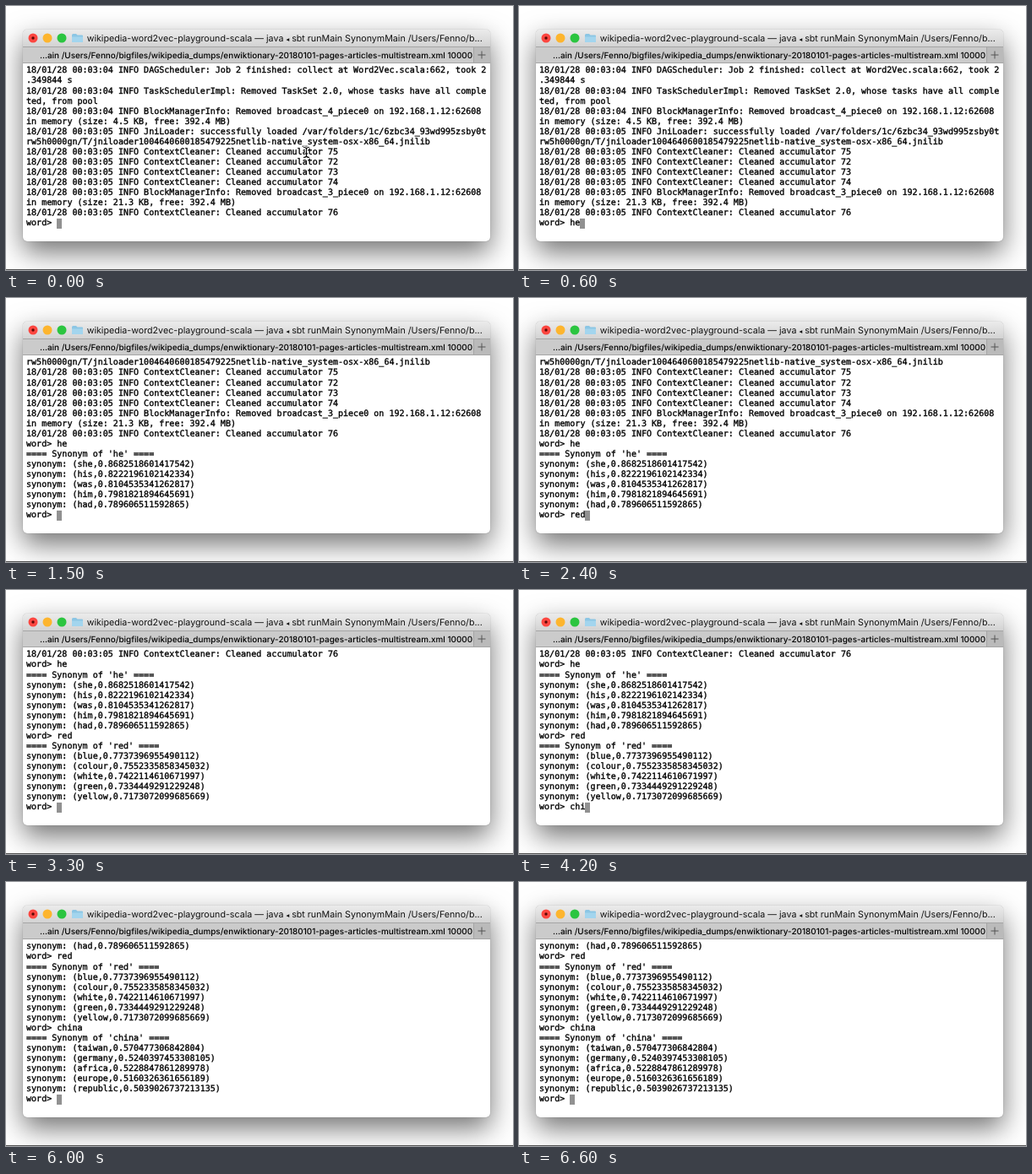
Animation, 600 px wide and 313 px high, one loop 6.9 s. Source, as an HTML page:

```html
<!DOCTYPE html>
<html lang="en">
<head>
<meta charset="utf-8">
<title>Synonym terminal</title>
<style>
html, body { margin: 0; width: 100%; height: 100%; overflow: hidden; background: #fff; }
.stage { position: relative; width: 600px; height: 313px; overflow: hidden; }
.window {
  position: absolute; left: 20px; top: 28px; width: 553px; height: 251px;
  border-radius: 5px; background: #fff;
  box-shadow: 0 0 1px rgba(0,0,0,.45), 0 13px 32px rgba(0,0,0,.55);
}
.floor { position: absolute; left: 0; top: 312px; width: 600px; height: 1px; background: #555; }
svg { position: absolute; left: 0; top: 0; }
svg text { font-family: Inter, "Open Sans", sans-serif; text-anchor: middle; text-rendering: geometricPrecision; }
pre {
  position: absolute; left: 24px; top: 71.4px; margin: 0; color: #000;
  font: 10.05px/12.07px "DejaVu Sans Mono", monospace;
  -webkit-text-stroke: .35px #000;
  text-rendering: geometricPrecision;
}
#caret { position: absolute; width: 6px; height: 12px; top: 252px; background: #919191; }
</style>
</head>
<body>
<div class="stage">
  <div class="window"></div>
  <div class="floor"></div>
  <svg width="600" height="313" viewBox="0 0 600 313">
    <defs>
      <linearGradient id="bar" x2="0" y2="1">
        <stop offset="0" stop-color="#ebebeb"/>
        <stop offset="1" stop-color="#d3d3d3"/>
      </linearGradient>
    </defs>
    <path d="M20 48V33a5 5 0 0 1 5-5H568a5 5 0 0 1 5 5V48Z" fill="url(#bar)"/>
    <path d="M20 48H573V68H20Z" fill="#cbcbcb"/>
    <path d="M553 48H573V68H553Z" fill="#bababa"/>
    <path d="M20 48.5H573M20 67.5H573M553.5 48V68" stroke="#a5a5a5" fill="none"/>
    <path d="M563 53.5V62.5M558.5 58H567.5" stroke="#555" fill="none"/>
    <circle cx="32" cy="38" r="5.5" fill="#fc4640"/>
    <circle cx="32" cy="38" r="1.7" fill="#5a0804"/>
    <circle cx="49" cy="38" r="5.5" fill="#fdb52e"/>
    <circle cx="66" cy="38" r="5.5" fill="#2bc540"/>
    <path d="M78 34.5q0-1.5 1.5-1.5H83l1.5 1.5H90q1 0 1 1V42q0 1-1 1H79q-1 0-1-1Z" fill="#8cc6e4"/>
    <path d="M78 36.5H91V42q0 1-1 1H79q-1 0-1-1Z" fill="#a3d5ee"/>
    <text x="329.7" y="42" font-size="10.7" fill="#111">wikipedia-word2vec-playground-scala — java <tspan font-size="7.5">◂</tspan> sbt runMain SynonymMain /Users/Fenno/b...</text>
    <text x="296" y="62" font-size="9.92" font-weight="500">...ain /Users/Fenno/bigfiles/wikipedia_dumps/enwiktionary-20180101-pages-articles-multistream.xml 10000</text>
  </svg>
  <pre id="screen"></pre>
  <div id="caret"></div>
  <svg id="pointer" width="600" height="313" viewBox="0 0 600 313" fill="none">
    <defs>
      <path id="beam" d="M352 167.5q3 0 3.5 1.5q.5-1.5 3.5-1.5M355.5 169V178M352 179.5q3 0 3.5-1.5q.5 1.5 3.5 1.5M353.5 175H357.5"/>
    </defs>
    <use href="#beam" stroke="#fff" stroke-width="3"/>
    <use href="#beam" stroke="#000" stroke-width="1.2"/>
  </svg>
</div>
<script>
const LOOP = 6900, ROWS = 16, CELL = 6.05, PROMPT = 'word> ';
const $ = id => document.getElementById(id);
const info = (sec, msg) => `18/01/28 00:03:0${sec} INFO ${msg}`;
const cleaned = n => info(5, `ContextCleaner: Cleaned accumulator ${n}`);
const removed = (sec, n, size) => [
  info(sec, `BlockManagerInfo: Removed broadcast_${n}_piece0 on 192.168.1.12:62608`),
  `in memory (size: ${size} KB, free: 392.4 MB)`
];

const log = [
  info(4, 'DAGScheduler: Job 2 finished: collect at Word2Vec.scala:662, took 2'),
  '.349844 s',
  info(4, 'TaskSchedulerImpl: Removed TaskSet 2.0, whose tasks have all comple'),
  'ted, from pool',
  ...removed(4, 4, '4.5'),
  info(5, 'JniLoader: successfully loaded /var/folders/1c/6zbc34_93wd995zsby0t'),
  'rw5h0000gn/T/jniloader1004640600185479225netlib-native_system-osx-x86_64.jnilib',
  ...[75, 72, 73, 74].map(cleaned),
  ...removed(5, 3, '21.3'),
  cleaned(76)
];

// keys: times at which the typed prefix reaches the given length
const queries = [
  { word: 'he', keys: [[300, 1], [600, 2]], done: 900,
    hits: 'she,0.8682518601417542 his,0.8222196102142334 was,0.8104535341262817 him,0.7981821894645691 had,0.789606511592865' },
  { word: 'red', keys: [[2100, 1], [2400, 3]], done: 3000,
    hits: 'blue,0.7737396955490112 colour,0.7552335858345032 white,0.7422114610671997 green,0.7334449291229248 yellow,0.7173072099685669' },
  { word: 'china', keys: [[3900, 1], [4200, 3], [4500, 5]], done: 4800,
    hits: 'taiwan,0.570477306842804 germany,0.5240397453308105 africa,0.5228847861289978 europe,0.5160326361656189 republic,0.5039026737213135' }
];

function linesAt(t) {
  const lines = [...log];
  let typed = '';
  for (const { word, keys, done, hits } of queries) {
    if (t >= done) {
      lines.push(PROMPT + word, `==== Synonym of '${word}' ====`,
        ...hits.split(' ').map(h => `synonym: (${h})`));
    } else {
      for (const [at, count] of keys) if (t >= at) typed = word.slice(0, count);
    }
  }
  return [...lines, PROMPT + typed].slice(-ROWS);
}

let shown = '';
function draw(now) {
  const t = (now - start) % LOOP;
  const lines = linesAt(t), text = lines.join('\n');
  if (text !== shown) {
    $('screen').textContent = shown = text;
    $('caret').style.left = 24 + lines[ROWS - 1].length * CELL + 'px';
    $('pointer').style.display = t < queries[0].keys[0][0] ? '' : 'none';
  }
}

const start = performance.now();
function tick() {
  draw(performance.now());
  requestAnimationFrame(tick);
}
tick();
</script>
</body>
</html>
```
